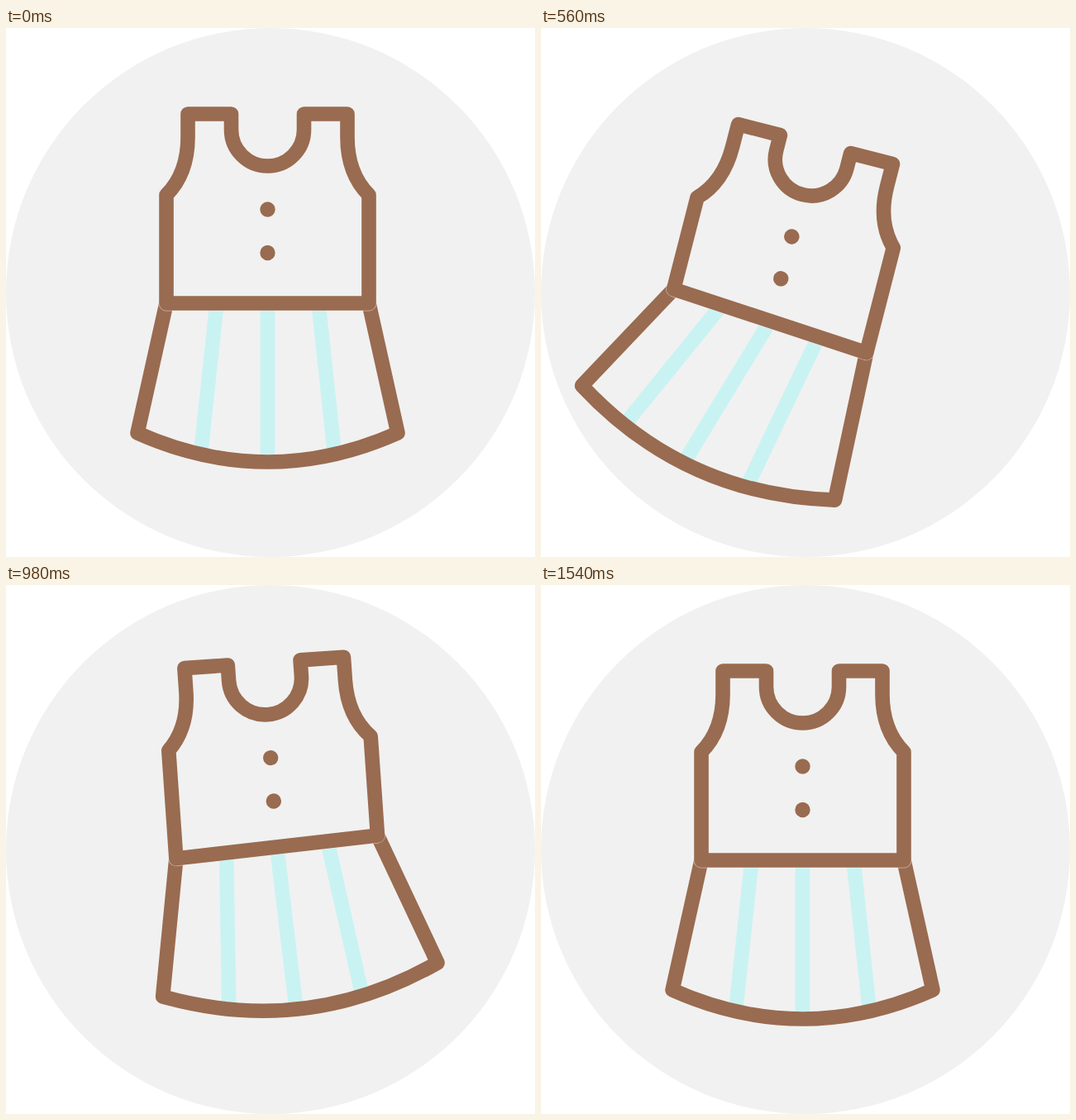
Recreate the animation shown at these times as an HTML page. Size 640 by 640 pixels, loop 1.8 s.

```html
<!DOCTYPE html>
<html lang="en">
<head>
<meta charset="utf-8">
<title>Swinging dress</title>
<style>
  html, body { margin: 0; width: 100%; height: 100%; overflow: hidden; background: #fff; }
  svg { display: block; width: 100vw; height: 100vh; }
  .line { fill: none; stroke: #996b50; stroke-width: 17.6; stroke-linejoin: round; stroke-linecap: round; }
  .gap { fill: none; stroke: #f1f1f1; stroke-width: 18.8; stroke-linejoin: round; opacity: .6; }
  .stripe { stroke: #c9f3f2; stroke-width: 17.6; }
</style>
</head>
<body>
<svg viewBox="0 0 640 640">
  <circle cx="320" cy="320" r="320" fill="#f1f1f1"/>
  <g id="dress">
    <line class="stripe"/>
    <line class="stripe"/>
    <line class="stripe"/>
    <path id="skirt" class="line"/>
    <path id="gap" class="gap"/>
    <path id="bodice" class="line"/>
    <g fill="#996b50">
      <circle cx="316.5" cy="219.5" r="9.2"/>
      <circle cx="316.5" cy="272" r="9.2"/>
    </g>
  </g>
</svg>
<script>
const LOOP = 1800, MID = 316.5, WAIST = 333, HALF = 122.5, SAG = 35;

// Swing peaks: time, dress angle, sideways sway and tilt of the hem
const SWING = [
  [0, 0, 0, 0],
  [560, 14.4, -35.6, 29],
  [910, -7.2, 29, -14.5],
  [1110, 4.3, -14, 5.6],
  [1345, -1.9, 0, 0],
  [1540, 0, 0, 0]
];
// Vertical bounce: time, offset
const BOUNCE = [[0, 0], [660, 36.6], [1140, -25.6], [1420, 0]];

const $ = id => document.getElementById(id);
const dress = $('dress'), skirt = $('skirt'), gap = $('gap'), bodice = $('bodice');
const stripes = [...document.querySelectorAll('.stripe')];
const { abs, hypot, max, cos, PI } = Math;
const ease = p => 0.5 - 0.5 * cos(PI * p);

function sample(keys, t) {
  const i = keys.findIndex(k => k[0] > t);
  if (i < 0) return keys[keys.length - 1].slice(1);
  const a = keys[i - 1], b = keys[i];
  const p = ease((t - a[0]) / (b[0] - a[0]));
  return a.slice(1).map((v, n) => v + (b[n + 1] - v) * p);
}

const bezier = (a, b, c, t) => (1 - t) * (1 - t) * a + 2 * t * (1 - t) * b + t * t * c;

// Height of the hem curve at x
function hemY(x, l, c, r) {
  let lo = 0, hi = 1;
  for (let i = 0; i < 20; i++) {
    const mid = (lo + hi) / 2;
    if (bezier(l[0], c[0], r[0], mid) < x) lo = mid; else hi = mid;
  }
  return bezier(l[1], c[1], r[1], lo);
}

function draw(t) {
  const [turn, sway, tilt] = sample(SWING, t), [drop] = sample(BOUNCE, t);

  // The hem widens as it sways; the waist rises on the leading side
  const spread = 1.2 * max(0, abs(sway) - abs(tilt));
  const lift = 0.35 * abs(sway) + 0.5 * spread;
  const waistL = WAIST - (sway < 0 ? lift : 0);
  const waistR = WAIST - (sway > 0 ? lift : 0);
  const hem = 490 - tilt * tilt / 220;
  const left = [MID - 157.5 + sway - spread, hem - tilt];
  const right = [MID + 157.5 + sway + spread, hem + tilt];
  const dx = right[0] - left[0], dy = right[1] - left[1], k = 2 * SAG / hypot(dx, dy);
  const ctrl = [(left[0] + right[0]) / 2 - k * dy, (left[1] + right[1]) / 2 + k * dx];

  dress.setAttribute('transform', `translate(0 ${drop}) rotate(${turn} ${MID} 166.5)`);
  skirt.setAttribute('d', `M${MID - HALF} ${waistL}L${left}Q${ctrl} ${right}L${MID + HALF} ${waistR}`);

  const top = `M220 104H272.5V123A44 44 0 0 0 360.5 123V104H413V132` +
    `C413 163 423 186 439 202V${waistR}L194 ${waistL}V202C210 186 220 163 220 132Z`;
  bodice.setAttribute('d', top);
  gap.setAttribute('d', top);

  const shift = -tilt * (0.7 + abs(tilt) / 22);
  stripes.forEach((stripe, i) => {
    const side = i - 1;
    const x1 = MID + side * 61.5, x2 = MID + side * 81 + shift;
    const y1 = (waistL + waistR) / 2 + (waistR - waistL) * side / 4;
    const ends = { x1, y1, x2, y2: hemY(x2, left, ctrl, right) };
    for (const name in ends) stripe.setAttribute(name, ends[name]);
  });
}

const start = performance.now();
function tick() {
  draw((performance.now() - start) % LOOP);
  requestAnimationFrame(tick);
}
tick();
</script>
</body>
</html>
```
